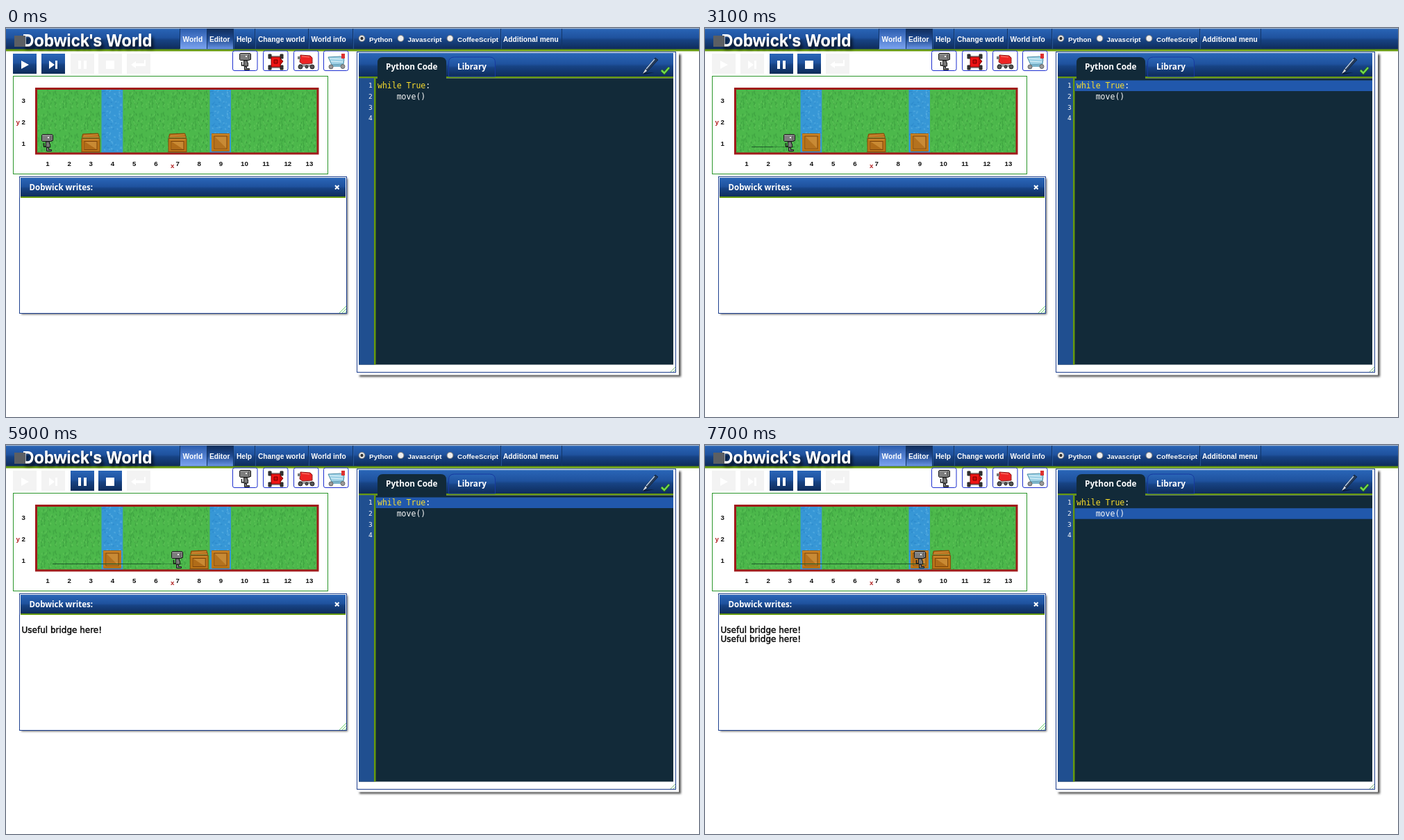
An HTML page that plays this animation: 998 by 561 pixels, repeating every 8000 ms.

```html
<!DOCTYPE html>
<html lang="en">
<head>
<meta charset="utf-8">
<title>Dobwick's World</title>
<style>
html, body { margin: 0; width: 100%; height: 100%; overflow: hidden; background: #fff; }
svg { display: block; width: 998px; height: 561px; }
text { white-space: pre; }
.logo { font: bold 23.4px "Liberation Sans", Arial, sans-serif; fill: #fff; text-shadow: 0 1px 0 #bbb, 3px 5px 4px #000b; }
.menu { font: bold 10.2px "Liberation Sans", Arial, sans-serif; fill: #fff; }
.radio { font-size: 9.95px; }
.tab { font: bold 11.8px "Open Sans", "Noto Sans", sans-serif; fill: #fff; }
.code { font: 11.5px "DejaVu Sans Mono", monospace; fill: #f8f8f8; }
.num { font-size: 9.5px; }
.key { fill: #fbde2d; }
.axis { font: bold 9.7px "Liberation Sans", Arial, sans-serif; fill: #111; }
.red { fill: #b22222; }
.say { font: 12px "DejaVu Sans", sans-serif; fill: #000; stroke: #000; stroke-width: .4px; }
.off rect { fill: #f3f3f3; }
.hover rect { fill: #2a68bc; }
.box { fill: #fff; stroke: #1d2fd0; }
</style>
</head>
<body>
<svg viewBox="0 0 998 561">
<defs>
  <linearGradient id="bar" x2="0" y2="1">
    <stop offset="0" stop-color="#2a66b8"/><stop offset=".45" stop-color="#1f529e"/>
    <stop offset=".55" stop-color="#174384"/><stop offset="1" stop-color="#0e2b59"/>
  </linearGradient>
  <linearGradient id="lit" x2="0" y2="1">
    <stop offset="0" stop-color="#2a5cae"/><stop offset="1" stop-color="#7ba3f0"/>
  </linearGradient>
  <linearGradient id="pick" x2="0" y2="1">
    <stop offset="0" stop-color="#0f2c5a"/><stop offset=".5" stop-color="#1f4a90"/>
    <stop offset="1" stop-color="#6a95e6"/>
  </linearGradient>
  <filter id="soft" x="-5%" y="-5%" width="110%" height="110%"><feGaussianBlur stdDeviation="1.5"/></filter>
  <pattern id="grass" x="45" y="88.5" width="31.1" height="31" patternUnits="userSpaceOnUse">
    <rect width="32" height="32" fill="#4cb84b"/>
    <path id="blades" fill="none" stroke="#389a3c"/>
    <path id="tips" fill="none" stroke="#65c95c"/>
  </pattern>
  <pattern id="water" x="45" y="88.5" width="31.1" height="31" patternUnits="userSpaceOnUse">
    <rect width="32" height="32" fill="#3797d6"/>
    <path id="deep" fill="none" stroke="#2683c8"/>
    <path id="foam" fill="none" stroke="#62b6e6"/>
  </pattern>
  <g id="robot">
    <path d="M1.500.5h14l1 1v8h-2v1h-13l-1-1v-8z" fill="#7d7d7d" stroke="#1a1a1a"/>
    <path d="M2 2h12" stroke="#9d9d9d"/>
    <path d="M13.500 2v7" stroke="#555"/>
    <rect x="9" y="4" width="2" height="2" fill="#eee"/>
    <path d="M6.500 11h5v3h1v5h-6z" fill="#777" stroke="#1a1a1a"/>
    <path d="M3.500 13v5h3" fill="none" stroke="#1a1a1a" stroke-width="1.500"/>
    <path d="M7.500 19.500h3v3h4v2h-7z" fill="#777" stroke="#1a1a1a"/>
  </g>
  <g id="crate">
    <path d="M2 2l22-1 2 6H1z" fill="#a8640f" stroke="#87450a"/>
    <path d="M3 4l21-1M2 6h23" stroke="#e0a04a"/>
    <rect x=".5" y="8.500" width="26" height="19" fill="#bb7417" stroke="#87480c"/>
    <path d="M2 10h23" stroke="#d99a42"/>
    <rect x="4.500" y="12.500" width="18" height="12" fill="#c98a33" stroke="#7c430c"/>
    <path d="M5 24V13l17 11z" fill="#b06c19"/>
  </g>
  <g id="bridge">
    <rect width="26" height="26" fill="#bd7718"/>
    <path d="M1 .5h24M1 25.500h24" stroke="#a3600f"/>
    <path d="M1 2h24" stroke="#d7933a"/>
    <rect x="4" y="4" width="18" height="18" fill="#c88a35" stroke="#7c430c"/>
    <path d="M4.500 21.500v-17l17 17z" fill="#b4721f"/>
  </g>
</defs>

<!-- editor window -->
<rect x="509" y="38" width="463" height="465" fill="#555" filter="url(#soft)"/>
<rect x="505" y="34" width="464" height="466.500" fill="#fff"/>
<rect x="505.500" y="34.500" width="459" height="462" fill="#fff" stroke="#1d3f8f"/>
<rect x="508" y="36" width="453" height="35" fill="url(#bar)"/>
<rect x="508" y="70" width="453" height="2.500" fill="#66990f"/>
<rect x="508" y="72.500" width="453" height="413" fill="#122a39"/>
<rect x="508" y="72.500" width="22" height="413" fill="#204f90"/>
<rect x="530" y="72.500" width="2.500" height="413" fill="#66990f"/>
<path d="M535 73V50q0-8 8-8h83q8 0 8 8v23z" fill="#122a39"/>
<path d="M637.500 70V50q0-8 8-8h51q8 0 8 8v20z" fill="url(#bar)" stroke="#1739a0"/>
<text class="tab" x="547" y="60">Python Code</text>
<text class="tab" x="650" y="60">Library</text>
<path d="M916 65l18-1-15 3z" fill="#000" opacity=".5"/>
<path d="M918 65l3-6 14-16 4 3-15 16z" fill="#253a58" stroke="#0b1a30" stroke-width=".7"/>
<path d="M922 59l12-14" stroke="#b7cbe4" stroke-width="1.500"/>
<path d="M917 66l4-7 2 3z" fill="#d9dde2"/>
<path d="M944 61l4 4 7-8" fill="none" stroke="#245f16" stroke-width="4"/>
<path d="M944 61l4 4 7-8" fill="none" stroke="#71d84c" stroke-width="2.500"/>
<rect id="line" x="532.500" width="428.500" height="15.500" fill="#2158ac"/>
<text class="code" x="535" y="87"><tspan class="key">while True</tspan>:</text>
<text class="code" x="535" y="102.500">    move()</text>
<g id="nums"></g>
<path d="M957 496l7-7M961 496l3-3" stroke="#7db87d"/>

<!-- output window -->
<rect x="22" y="217" width="470" height="196" fill="#666" filter="url(#soft)"/>
<rect x="19.500" y="214.500" width="471" height="197" fill="#fff" stroke="#1d3f8f"/>
<rect x="21" y="216" width="468" height="28" fill="url(#bar)"/>
<rect x="21" y="243" width="468" height="2" fill="#66990f"/>
<text class="tab" style="font-size:11.5px" x="33.500" y="234">Dobwick writes:</text>
<path d="M474 227l5.500 5.500M479.500 227l-5.500 5.500" stroke="#fff" stroke-width="2"/>
<path d="M480 411l10-10M484 411l6-6M488 411l2-2" stroke="#6fce6f"/>
<text class="say" id="say1" x="22.500" y="270.500">Useful bridge here!</text>
<text class="say" id="say2" x="22.500" y="283.500">Useful bridge here!</text>

<!-- world -->
<rect x="10.500" y="69.500" width="453" height="141" fill="#fff" stroke="#2b962b"/>
<rect x="43.500" y="87.500" width="405.500" height="93.500" fill="url(#grass)"/>
<rect x="137.500" y="88.500" width="30.800" height="92" fill="url(#water)"/>
<rect x="293.500" y="88.500" width="30.500" height="92" fill="url(#water)"/>
<rect x="43.500" y="87.500" width="405.500" height="93.500" fill="none" stroke="#a01a1a" stroke-width="3"/>
<g id="axes"></g>
<text class="axis red" x="14.500" y="139">y</text>
<text class="axis red" x="237" y="202">x</text>
<use id="laid" href="#bridge" x="140" y="152"/>
<use href="#bridge" x="296" y="152"/>
<use id="first" href="#crate" x="108.500" y="151"/>
<use id="second" href="#crate" y="151"/>
<path id="trail" stroke="#1f5b2b" stroke-width="1"/>
<path id="fresh" stroke="#1f5b2b" stroke-width="1" opacity=".5"/>
<use id="hero" href="#robot" y="153"/>

<!-- header -->
<rect width="998" height="31" fill="url(#bar)"/>
<rect width="998" height="1.200" fill="#a9b9cd"/>
<rect y="30.500" width="998" height="3" fill="#66990f"/>
<rect x="250" y="1" width="39" height="29.500" fill="url(#lit)"/>
<rect x="289" y="1" width="38" height="29.500" fill="url(#pick)"/>
<path d="M250.500 1v29M289.500 1v29M327.500 1v29M358.500 1v29M435.500 1v29M499.500 1v29M712.500 1v29M800.500 1v29" stroke="#123568"/>
<path d="M328.500 1v29M359.500 1v29M436.500 1v29M500.500 1v29M713.500 1v29" stroke="#3567ad" opacity=".6"/>
<text class="logo" x="23.500" y="26">Dobwick's World</text>
<rect x="12" y="11" width="16" height="16" fill="#5c5f63"/>
<g id="menu"></g>

<g id="buttons"></g>

<!-- robot models -->
<g id="frames"></g>
<use href="#robot" x="336" y="36"/>
<g transform="translate(377 37)">
  <path d="M1 1h4v6H1zM18 1h4v6h-4zM1 17h4v6H1zM18 17h4v6h-4zM5 4h13M5 20h13" fill="#333" stroke="#222"/>
  <rect x="5" y="5" width="13" height="14" fill="#f01414" stroke="#800"/>
  <path d="M18 7l4 4-4 5M9 9h5v5H9z" fill="#d30808" stroke="#700"/>
</g>
<g transform="translate(419 36)">
  <path d="M5 3l14 1 3 3v8l-14 1-4-3z" fill="#ed2424" stroke="#8c2020"/>
  <path d="M7 5l11 1" stroke="#ff8b7a"/>
  <path d="M3 16l21 1v3L4 20z" fill="#9b9b9b"/>
  <path d="M1 5h4v4H1z" fill="#777"/>
  <g fill="#555" stroke="#222"><circle cx="5" cy="20" r="3"/><circle cx="14" cy="20" r="2"/><circle cx="22" cy="20" r="3"/></g>
</g>
<g transform="translate(463 37)">
  <path d="M1 5l18-1 5 4-1 7-17 1z" fill="#9fd2e6" stroke="#4c8ca6"/>
  <path d="M3 7l18 1M5 11l17 1" stroke="#e3f6fc"/>
  <path d="M4 16l19-1v4H6z" fill="#7ab4ca"/>
  <path d="M20 0h5v7h-5z" fill="#dd3030"/>
  <g fill="#999" stroke="#666"><circle cx="5" cy="19" r="3"/><circle cx="22" cy="18.500" r="3"/></g>
</g>

<path id="mouse" d="M.5.5v13l3-3 2.200 5 2-1-2.200-4.700h4z" fill="#fff" stroke="#111"/>
</svg>

<script>
const $ = id => document.getElementById(id);
const LOOP = 8000, CELL = 31.2;

let seed = 7;
const rnd = n => (seed = seed * 16807 % 2147483647) / 2147483647 * n;
function strokes(id, count, dx, dy) {
  let d = "";
  for (let i = 0; i < count; i++)
    d += `M${rnd(29).toFixed(1)} ${rnd(27).toFixed(1)}l${(rnd(2 * dx) - dx).toFixed(1)} ${dy}`;
  $(id).setAttribute("d", d);
}
strokes("blades", 42, 2, 3);
strokes("tips", 20, 2, 2);
strokes("deep", 20, 4, 1);
strokes("foam", 26, 3, 1);

const label = (cls, x, y, s) => `<text class="${cls}" x="${x}" y="${y}">${s}</text>`;

let axes = "";
for (let i = 0; i < 13; i++) axes += label("axis", 57.2 + CELL * i, 199, i + 1);
for (let i = 0; i < 3; i++) axes += label("axis", 22.5, 170 - 31.2 * i, i + 1);
$("axes").innerHTML = axes;

$("nums").innerHTML = [1, 2, 3, 4].map(n => label("code num", 522, 70.8 + 15.6 * n, n)).join("");

const items = [[254.5, "World"], [293, "Editor"], [332, "Help"], [363, "Change world"],
  [439.5, "World info"], [716, "Additional menu"]];
const radios = [[512, 523, "Python"], [568, 578.5, "Javascript"], [639, 650, "CoffeeScript"]];
$("menu").innerHTML = items.map(([x, s]) => label("menu", x, 19.5, s)).join("") +
  radios.map(([c, x, s], i) =>
    `<circle cx="${c + .5}" cy="15" r="4.500" fill="#eee" stroke="#777"/>` +
    (i ? "" : `<circle cx="${c + .5}" cy="15" r="2.200" fill="#333"/>`) +
    label("menu radio", x, 20, s)).join("");

$("frames").innerHTML = [326.5, 370.5, 414.5, 457.5].map(x =>
  `<rect class="box" x="${x}" y="33" width="35.500" height="28.500" rx="2.500"/>`).join("");

const icons = ["M12 10l11 6-11 6z", "M11 10l8 6-8 6zM20 10h3v12h-3z",
  "M11 10h4v12h-4zM19 10h4v12h-4z", "M11 10h12v12H11z", "M6 16l7-5v3h12V9h2v9H13v3z"];
$("buttons").innerHTML = icons.map((d, i) =>
  `<g transform="translate(${[10, 51, 93, 133, 174][i]} 37)">` +
  `<rect width="34" height="29" fill="url(#bar)"/><path d="${d}" fill="#fff"/></g>`).join("");
const buttons = [...$("buttons").children];

const moves = [2500, 3100, 3700, 4600, 5300, 5900, 6500, 7100];
const traced = [2800, 3400, 4300, 4900, 5600, 6200, 6800, 7700];
const steps = [1600, 2200, 2500, 2800, 3100, 3400, 4000, 4300, 4600, 4900,
  5300, 5600, 5900, 6200, 6500, 6800, 7400, 7700];
const passed = (list, t) => list.filter(e => t >= e).length;
const show = (id, on) => $(id).style.display = on ? "" : "none";
const trailX = n => 67 + CELL * n;

// Pointer position, sampled every 100 ms
function pointer(t) {
  const k = Math.floor(t / 100);
  if (k < 5 || k >= 28) return null;
  if (k < 12) {
    const p = ((k - 4) / 7) ** 0.8;
    return [235 - 207 * p, 575 - 527 * p];
  }
  if (k < 19) return [28, 48];
  if (k < 20) return [21, 48.5];
  if (k < 24) return null;
  const q = (k - 23) / 4;
  return [60 + 130 * q, 130 + 425 * q];
}

function draw(t) {
  const n = passed(moves, t), done = passed(traced, t);
  const running = t >= 1600, row = passed(steps, t);

  $("hero").setAttribute("x", Math.round(51 + CELL * n));
  $("trail").setAttribute("d", `M67 171.500H${trailX(done)}`);
  $("fresh").setAttribute("d", `M${trailX(done)} 171.500H${trailX(n)}`);
  show("first", n < 2);
  show("laid", n >= 2);
  $("second").setAttribute("x", 46.3 + CELL * (Math.max(7, n + 2) - 1));

  show("line", row);
  $("line").setAttribute("y", row % 2 ? 75.5 : 91.2);
  show("say1", t >= 4000);
  show("say2", t >= 7400);

  buttons.forEach((b, i) => {
    const on = i < 2 ? !running : i < 4 && running;
    b.setAttribute("class", on ? (i === 0 && t >= 1100 ? "hover" : "") : "off");
  });

  const p = pointer(t);
  show("mouse", p);
  if (p) $("mouse").setAttribute("transform", `translate(${p})`);
}

const start = performance.now();
function tick() {
  draw((performance.now() - start) % LOOP);
  requestAnimationFrame(tick);
}
tick();
</script>
</body>
</html>
```
